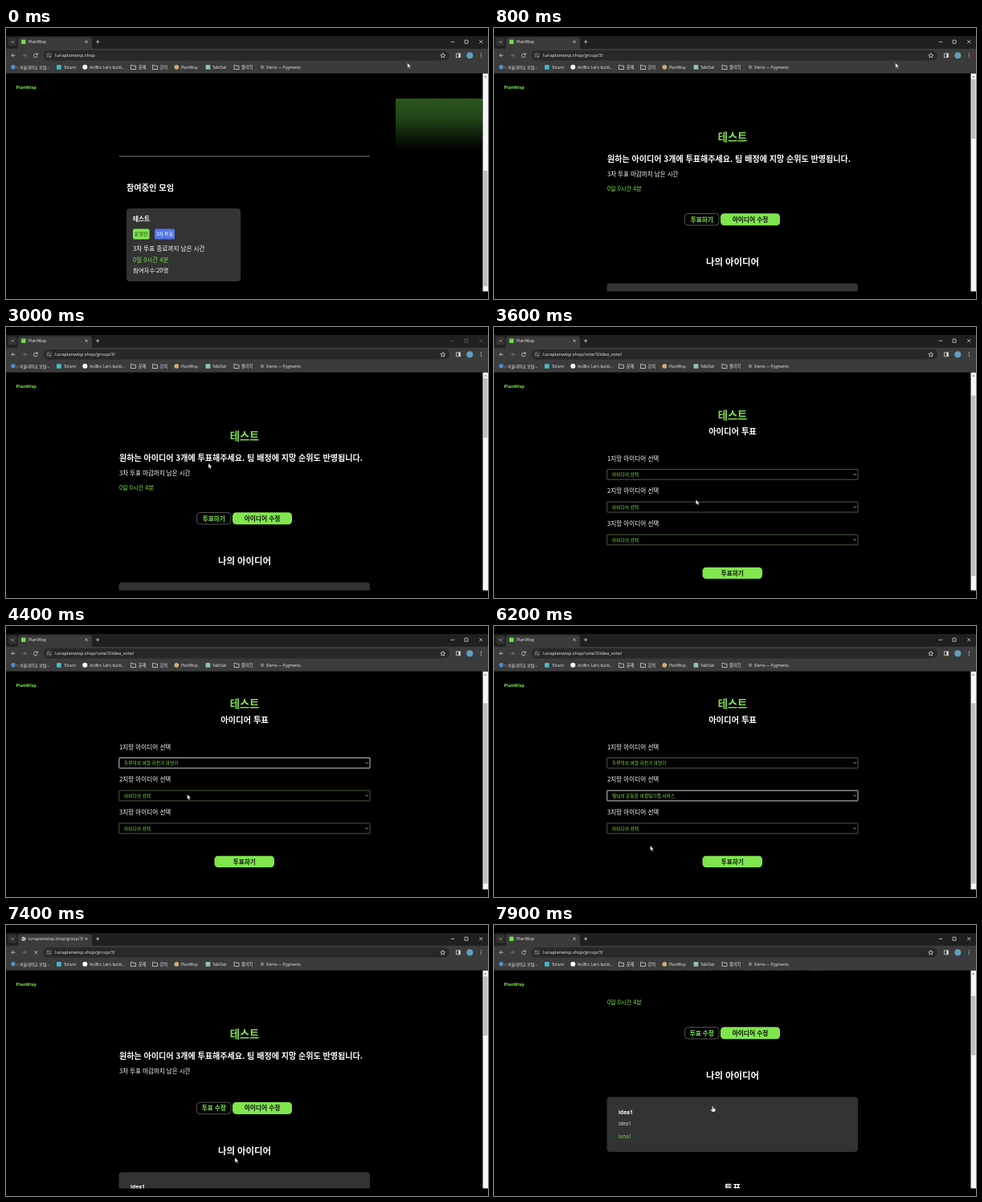
An HTML page for the animation above (8 s loop, 600 by 338 pixels).

```html
<!DOCTYPE html>
<html lang="ko">
<head>
<meta charset="utf-8">
<title>Idea vote</title>
<style>
html, body { margin: 0; width: 100%; height: 100%; overflow: hidden; background: #000; }
svg { display: block; width: 100vw; height: 100vh; }
text { font-family: "Noto Sans CJK KR", "Noto Sans CJK", "Noto Sans", sans-serif; white-space: pre; }
.ui text, .latin text { font-family: "Open Sans", "Noto Sans", "Noto Sans CJK KR", sans-serif; }
.ui text { fill: #ececec; }
.icon { fill: none; stroke: #d4d4d4; stroke-width: .8; }
</style>
</head>
<body>
<svg id="stage" viewBox="0 0 600 338"></svg>
<script>
const GREEN = "#80e64e", LOOP = 8000;
const HOST = "lunaplanwisp.shop", BRAND = "PlanWisp";

// y is the optical middle of the line
const text = (s, x, y, size, fill = "#fff", weight = 400, anchor = "start", id = "") =>
  `<text ${id && `id="${id}"`} x="${x}" y="${(y + size * .37).toFixed(2)}" font-size="${size}" fill="${fill}" font-weight="${weight}" text-anchor="${anchor}">${s}</text>`;
const mid = (s, y, size, fill, x = 297) => text(s, x, y, size, fill, 700, "middle");
const box = (x, y, w, h, fill, r = 0, more = "") =>
  `<rect x="${x}" y="${y}" width="${w}" height="${h}" rx="${r}" fill="${fill}" ${more}/>`;
const icon = (d, more = "") => `<path class="icon" d="${d}" ${more}/>`;
const dot = (x, y, r, fill) => `<circle cx="${x}" cy="${y}" r="${r}" fill="${fill}"/>`;
const folder = x => icon(`M${x} 46.3h2l.8 1h3.2v4.2h-6z`);
const mark = (s, x, size = 4.8) => text(s, x, 48.8, size);

const browser = `<g class="ui">
  ${box(0, 10, 600, 16, "#1f2020")}
  ${box(2.5, 12, 11, 10.5, "#333", 3)}
  ${icon("M6.4 16.5l1.7 1.7 1.7-1.7")}
  <path d="M12 26q3 0 3-3v-8q0-3.5 3.5-3.5h85q3.5 0 3.5 3.5v8q0 3 3 3z" fill="#3b3b3b"/>
  <g id="favicon">${box(19, 14.5, 5.5, 5.5, "#6fdc45", 1)}</g>
  <g id="globe">${dot(22, 17.2, 2.6, "#c8c8c8")}${icon("M19.8 16.5l2 .8 2 2M22 15l1.8 1", 'style="stroke:#3b3b3b"')}</g>
  ${text("", 28, 17.4, 5.2, "#fff", 400, "start", "title")}
  ${icon("M98.4 15.6l3.2 3.2m0-3.2l-3.2 3.2M112 17.2h4.4m-2.2-2.2v4.4")}
  <g id="controls">${icon("M553.5 17.3h4.6M571 15.2h4v4h-4zM589.2 15.2l4 4m0-4l-4 4")}</g>
  ${box(0, 25.8, 600, 30.8, "#3b3b3b")}
  ${box(47, 28, 505, 12.5, "#282828", 6.2)}
  ${icon("M11.5 34.2h-4.6m2-2l-2 2 2 2")}
  ${icon("M20.8 34.2h4.6m-2-2l2 2-2 2", 'opacity=".45"')}
  <g id="reload">${icon("M39 33a2.4 2.4 0 1 0 .3 1.8M39.3 31.4v1.9h-1.9")}</g>
  <g id="halt">${icon("M35.2 32.2l4 4m0-4l-4 4")}</g>
  ${dot(53.6, 34.2, 4.4, "#3b3b3b")}
  ${icon("M51.2 33h2.3m1.6 0h.8M51.2 35.6h.8m1.6 0h2.3")}
  ${text("", 61, 34.3, 5.7, "#fff", 400, "start", "url")}
  ${icon("M543.8 31.3l.9 2 2.1.2-1.6 1.4.5 2.1-1.9-1.1-1.9 1.1.5-2.1-1.6-1.4 2.1-.2z")}
  ${icon("M560.5 31.8h5v4.8h-5z")}
  ${box(563.3, 31.8, 2.4, 4.8, "#d4d4d4")}
  ${dot(577.3, 34.2, 4, "#5f9fbd")}
  ${dot(591.5, 31.9, .6, "#ddd")}${dot(591.5, 34.2, .6, "#ddd")}${dot(591.5, 36.5, .6, "#ddd")}
  ${dot(9, 48.8, 2.7, "#4f8ed0")}${mark(":: 서울대학교 포털...", 13, 5)}
  ${box(63, 46, 5.8, 5.8, "#45b8c8", 1)}${mark("Tolumi", 72)}
  ${dot(98.3, 48.8, 3, "#fff")}${mark("ArcBin: Let's build...", 104)}
  ${folder(155.5)}${mark("문제", 165, 5.2)}
  ${folder(182.5)}${mark("강의", 191.5, 5.2)}
  ${dot(212.3, 48.8, 2.9, "#d3ab72")}${mark(BRAND, 218)}
  ${box(248.5, 46, 5.8, 5.8, "#8fc3b1", 1)}${mark("TalkOwl", 257)}
  ${folder(284)}${mark("물리학", 293, 5.2)}
  ${dot(319, 48.8, 2.4, "#777")}${mark("Demo — Pygments", 324)}
</g>`;

const home = `<g id="home">
  <linearGradient id="fade" x2="0" y2="1"><stop stop-color="#2b581d"/><stop offset=".4" stop-color="#204316"/><stop offset="1"/></linearGradient>
  ${box(485, 88, 108, 64, "url(#fade)")}
  ${box(141, 159, 312, 2, "#3a3a3a")}
  ${text("참여중인 모임", 150, 199.5, 10.2, "#fff", 700)}
  ${box(150, 225, 142, 91, "#333", 4)}
  ${text("테스트", 158, 238, 7.6, "#fff", 700)}
  ${box(158, 250.5, 20.5, 13, GREEN, 2)}${text("운영진", 168.2, 257, 6.1, "#173a0c", 400, "middle")}
  ${box(185, 250.5, 25, 13, "#5078e6", 2)}${text("3차 투표", 197.5, 257, 5.9, "#fff", 400, "middle")}
  ${text("3차 투표 종료까지 남은 시간", 158, 275, 7.6)}
  ${text("0일 0시간 4분", 158, 288.8, 7.5, GREEN)}
  ${text("참여자수:20명", 158, 302.3, 7.4)}
</g>`;

const group = `<g id="group">
  ${mid("테스트", 136.1, 13.2, GREEN)}
  ${text("원하는 아이디어 3개에 투표해주세요. 팀 배정에 지망 순위도 반영됩니다.", 141, 163, 10.06, "#fff", 700)}
  ${text("3차 투표 마감까지 남은 시간", 141, 182.3, 7.5)}
  <g id="timer">${text("0일 0시간 4분", 141, 200, 7.3, GREEN)}</g>
  <g id="lower">
    ${box(237.5, 231.5, 42.5, 14.5, "#000", 4, 'stroke="#777" stroke-width=".7"')}
    ${text("", 258.8, 238.8, 7.6, GREEN, 700, "middle", "voteLabel")}
    ${box(282, 231.3, 74, 14.9, GREEN, 4.5)}
    ${text("아이디어 수정", 319, 238.8, 7.7, "#111", 700, "middle")}
    ${mid("나의 아이디어", 292.2, 11.4)}
    ${box(140.5, 318.5, 312.5, 68.5, "#333", 4)}
    <g class="latin">
      ${text("idea1", 155, 337.3, 6.6, "#fff", 700)}
      ${text("idea1", 155, 351.5, 6.2, "#ddd")}
      ${text("luna1", 155, 367.3, 6.3, GREEN)}
    </g>
    ${mid("투표", 432, 11.4)}
  </g>
</g>`;

const IDEAS = ["아이디어 선택", "두루미의 여행 자전거 마련기", "별님의 운동장 여행일기앱 서비스", "민트의 주말 산책 지도"];
const ROW = 10.8;
// each select: open and pick times, chosen option
const PICKS = [
  { open: 3900, pick: 4200, choice: 1 },
  { open: 4700, pick: 5400, choice: 2 },
  { open: 6500, pick: 6900, choice: 3 }
];
const selectY = i => 164 + i * 40.8;
const field = (p, i) => {
  const y = selectY(i);
  return text(`${i + 1}지망 아이디어 선택`, 141, y - 13.3, 7.6)
    + box(140.8, y + .4, 312.2, 12.8, "#000", .5, `id="field${i}" stroke-width=".8"`)
    + text(IDEAS[0], 147, y + 6.8, 5.7, GREEN, 400, "start", `value${i}`)
    + icon(`M447.5 ${y + 6}l1.6 1.6 1.6-1.6`);
};
const list = (p, i) => {
  const y = selectY(i) + 13.2;
  return `<g id="list${i}">` + box(140.8, y, 312.2, ROW * 4, "#000", 0, 'stroke="#777" stroke-width=".6"')
    + box(141, y, 311.8, ROW, "#1967d2", 0, `id="mark${i}"`)
    + IDEAS.map((s, k) => text(s, 147, y + ROW * (k + .5), 5.7, GREEN)).join("") + "</g>";
};
const vote = `<g id="vote">
  ${mid("테스트", 97.1, 13.2, GREEN)}
  ${mid("아이디어 투표", 117, 10.3)}
  ${PICKS.map(field).join("")}
  ${box(259.5, 286.8, 74.5, 14.2, GREEN, 4.5)}
  ${text("투표하기", 296.8, 293.7, 7.6, "#111", 700, "middle")}
  ${PICKS.map(list).join("")}
</g>`;

// stays in place while the page scrolls under it
const header = `<g class="latin">${box(0, 56, 594, 32, "#000")}${text(BRAND, 12.5, 74.3, 5.5, GREEN, 700)}</g>`;

document.getElementById("stage").innerHTML = `
  <clipPath id="view"><rect y="56.5" width="593.5" height="272"/></clipPath>
  ${box(0, 0, 600, 338, "#000")}
  <g clip-path="url(#view)">${home}${group}${vote}${header}</g>
  ${box(593.5, 56.5, 6.5, 272, "#f6f6f6")}
  ${box(594.3, 64, 5, 74, "#bdbdbd", 0, 'id="thumb"')}
  <path d="M595.3 61.6l1.5-1.8 1.5 1.8z" fill="#666"/>
  ${browser}
  <g id="cursor">
    <path id="arrow" d="M0 0v6.3l1.5-1.3 1 2.2 1-.5-1-2.1h2z" fill="#fff" stroke="#222" stroke-width=".4"/>
    <path id="hand" d="M-.7-.8q.7-.7 1.3 0v2.3l2.2.6q.7.3.6 1.2l-.5 2.7h-3.6l-2-2.5q.2-1 1.1-.5l.9.6z" fill="#fff" stroke="#222" stroke-width=".4"/>
  </g>`;

const $ = id => document.getElementById(id);
const show = (id, on) => $(id).style.display = on ? "" : "none";
const set = (id, name, value) => $(id).setAttribute(name, value);
const label = (id, s) => { if ($(id).textContent !== s) $(id).textContent = s; };

// [time, x, y], straight moves between
const PATH = [
  [0, 499.7, 43.5], [1950, 499.7, 43.5], [2700, 262, 164], [3000, 252, 170], [3300, 258, 238],
  [3500, 258, 238], [3800, 238, 170], [3900, 236, 171], [4200, 229, 193], [4400, 225.7, 210],
  [4700, 224, 211], [5400, 210, 245], [5900, 198, 268], [6200, 194.5, 274], [6400, 200, 252],
  [6500, 200, 252], [6900, 215, 296], [7200, 285, 290], [7400, 285, 290], [7900, 272.3, 227]
];
function along(t) {
  const k = PATH.findIndex(p => p[0] > t);
  if (k < 0) return PATH[PATH.length - 1].slice(1);
  const [a, b] = [PATH[k - 1], PATH[k]], u = (t - a[0]) / (b[0] - a[0]);
  return [a[1] + (b[1] - a[1]) * u, a[2] + (b[2] - a[2]) * u];
}
const ramp = (t, from, to) => Math.min(1, Math.max(0, (t - from) / (to - from)));

const VISITS = [
  { at: -1000, page: "home", path: "", thumb: [178, 144] },
  { at: 500, page: "group", path: "/group/3/", thumb: [64, 74] },
  { at: 3400, page: "vote", path: "/vote/3/idea_vote/", thumb: [64, 225] },
  { at: 7300, page: "group", path: "/group/3/", thumb: [64, 74] }
];

function draw(t) {
  const visit = VISITS.filter(v => v.at <= t).pop();
  const loading = t - visit.at < 200;
  const voted = t >= 7300;
  const voteScroll = 39 * ramp(t, 3400, 3700);
  const groupScroll = voted ? 104 * ramp(t, 7500, 7900) : 0;

  for (const p of ["home", "group", "vote"]) show(p, p === visit.page);
  set("vote", "transform", `translate(0 ${39 - voteScroll})`);
  set("group", "transform", `translate(0 ${-groupScroll})`);
  show("timer", !loading);
  set("lower", "transform", `translate(0 ${loading ? -10.3 : 0})`);
  label("voteLabel", voted ? "투표 수정" : "투표하기");

  const slide = visit.page === "vote" ? voteScroll * .83 : groupScroll * .235;
  set("thumb", "y", visit.thumb[0] + slide);
  set("thumb", "height", visit.thumb[1]);

  label("url", HOST + visit.path);
  label("title", loading ? HOST + visit.path : BRAND);
  show("favicon", !loading);
  show("globe", loading);
  show("reload", !loading);
  show("halt", loading);
  set("controls", "opacity", t >= 2500 && t < 3300 ? .35 : 1);

  const [x, y] = along(t);
  set("cursor", "transform", `translate(${x} ${y})`);
  const hand = t >= 7700;
  show("arrow", !hand);
  show("hand", hand);

  const active = PICKS.filter(p => t >= p.open).length - 1;
  PICKS.forEach((p, i) => {
    const top = selectY(i) + 13.2;
    const row = Math.min(3, Math.max(0, Math.floor((y - top) / ROW)));
    set("field" + i, "stroke", i === active ? "#fff" : "#5d7652");
    label("value" + i, IDEAS[t >= p.pick ? p.choice : 0]);
    show("list" + i, t >= p.open && t < p.pick);
    set("mark" + i, "y", top + row * ROW);
  });
}

function frame() {
  draw(Math.floor(performance.now() % LOOP / 100) * 100);
  requestAnimationFrame(frame);
}
frame();
</script>
</body>
</html>
```
